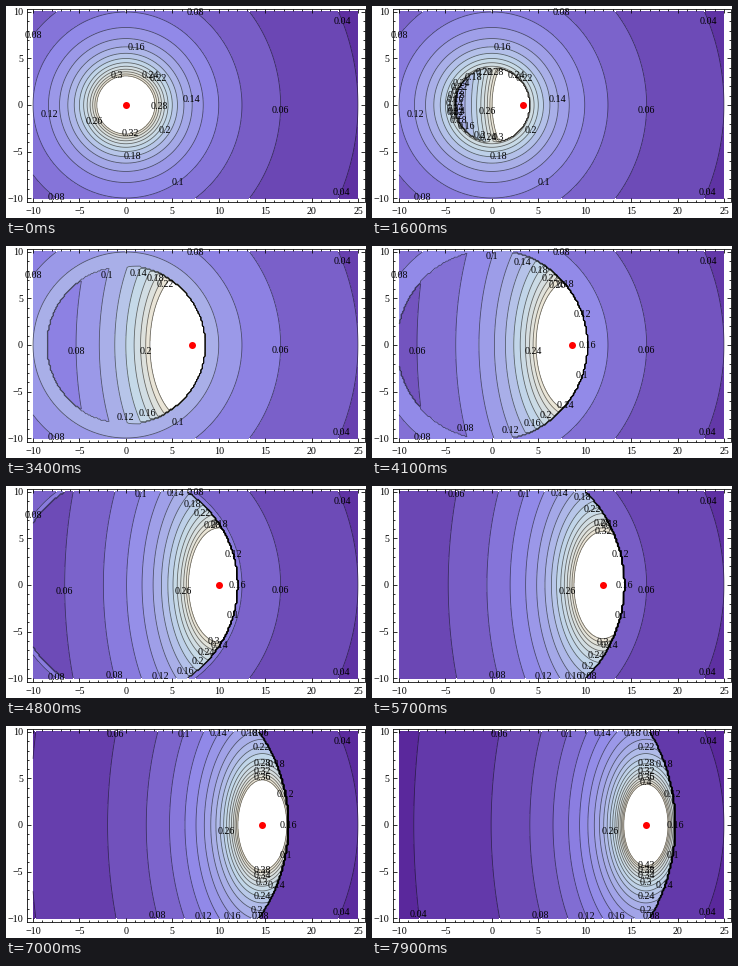
A matplotlib script for the animation above (8 s loop, 360x212 px).

```python
import numpy as np
import matplotlib.pyplot as plt
from matplotlib.animation import FuncAnimation
from matplotlib.ticker import MultipleLocator

W, H, DPI = 360, 212, 100
PX = 72 / DPI
FRAMES = 80
C_STEP, SPEED = 0.25, 0.84          # front radius per frame, charge speed / c
SQUASH = np.sqrt(1 - SPEED ** 2)
EDGE = 9.8                          # height of labels at the plot's border

plt.rcParams["font.family"] = "Liberation Serif"

LAKE = np.array([(0.293, 0.057, 0.529), (0.564, 0.528, 0.909),
                 (0.763, 0.847, 0.914), (0.941, 0.907, 0.834)])

# Label angles on the static circles 0.06, 0.08, ... 0.32
ANGLES = (-2, 53, -56, -173, 5, 80, -83, -33, 39, 50, -152, -2, 107, -82)
FRONT = (6, 18, 12, 16, 10, 14, 8)  # labels down the leading edge

X, Y = np.meshgrid(np.linspace(-10, 25, 235), np.linspace(-10, 10, 135))
STATIC = np.hypot(X, Y)
ARC = np.radians(np.linspace(0, 90, 181))


def lake(t):
    stops = np.linspace(0, 1, len(LAKE))
    return np.column_stack([np.interp(t, stops, c) for c in LAKE.T])


def top_level(k):
    """Highest contour in percent; everything above stays white."""
    v = np.interp(k, (0, 16, 34, 48, 57, 79), (32, 30, 22, 30, 32, 42))
    return int(2 * np.round(v / 2))


def potential(radius, charge):
    moving = np.hypot(X - charge, SQUASH * Y)
    dist = np.where(STATIC < radius, moving, STATIC)
    return 1 / np.maximum(dist, 1e-3)


def static_labels(radius, top):
    spots = [(4, 21), (4, -22), (8, 143), (8, 233)]
    spots += zip(range(6, top + 1, 2), ANGLES)
    for lv, deg in spots:
        r, a = 100 / lv, np.radians(deg)
        if r > radius:
            yield lv, r * np.cos(a), r * np.sin(a)


def arc_end(level, radius, charge):
    """Farthest visible point of a moving contour above the axis."""
    x = charge - np.cos(ARC) * 100 / level
    y = np.sin(ARC) * 100 / level / SQUASH
    ok = (y <= EDGE + 0.1) & (x >= -10)
    ok &= np.hypot(x, y) < radius - min(0.7, 0.1 * radius)
    hits = np.flatnonzero(ok)
    return [(x[i], y[i]) for i in hits[-1:]]


def moving_labels(radius, charge, top):
    """Alternate upper and lower arc ends, with a few labels on the left."""
    left = min(top - 2, 26)
    reach = charge + min(radius, 10)
    inside = [lv for lv in range(4, top + 1, 2) if 100 / lv < reach]
    on_left = {left}
    if radius < np.hypot(10, 10):    # trailing edge still on the stage
        on_left.update(inside[:1])
    for lv in inside:
        if lv in on_left:
            yield lv, charge - 100 / lv, -0.7
            continue
        base = left if lv > left else 0
        side = 1 if (lv - base) % 4 == 2 else -1
        for x, y in arc_end(lv, radius, charge):
            yield lv, x, side * y


def front_labels(radius):
    for lv, y in zip(FRONT, np.linspace(EDGE, -EDGE, len(FRONT))):
        if radius > 10 and lv > 100 / radius:
            yield lv, np.sqrt(radius ** 2 - y ** 2), y


def tail_labels(radius, top):
    """Pile of labels where contours collide on the trailing edge."""
    hi = min(100 / radius, top)
    levels = [v for v in range(4, top + 1, 2)
              if 100 / radius / (1 + SPEED) < v < hi]
    for i, a in enumerate(np.radians(np.linspace(145, 205, 10))):
        if levels:
            yield (levels[-1 - i % len(levels)],
                   radius * np.cos(a), radius * np.sin(a))


def all_labels(radius, charge, top):
    yield from static_labels(radius, top)
    if radius > 2:
        yield from moving_labels(radius, charge, top)
        yield from front_labels(radius)
    if 2 < radius < 6:
        yield from tail_labels(radius, top)


fig = plt.figure(figsize=(W / DPI, H / DPI), dpi=DPI, facecolor="white")
ax = fig.add_axes([20.5 / W, (H - 195.5) / H, 338 / W, 193 / H])
ax.set_xlim(-10.7, 25.7)
ax.set_ylim(-10.376, 10.376)
ax.set_autoscale_on(False)
for axis in (ax.xaxis, ax.yaxis):
    axis.set_major_locator(MultipleLocator(5))
    axis.set_minor_locator(MultipleLocator(1))
ax.tick_params(which="both", direction="in", top=True, right=True,
               width=0.8 * PX, labelsize=10 * PX)
ax.tick_params(which="major", length=4 * PX)
ax.tick_params(which="minor", length=2.5 * PX)
ax.tick_params(axis="x", pad=6 * PX)
ax.tick_params(axis="y", pad=3.5 * PX)
for spine in ax.spines.values():
    spine.set_linewidth(0.8 * PX)

dot, = ax.plot([0], [0], "o", color="red", ms=7 * PX, mew=0, zorder=6)
drawn = []


def update(k):
    while drawn:
        drawn.pop().remove()
    radius = C_STEP * k
    charge = SPEED * radius
    top = top_level(k)
    phi = potential(radius, charge)
    levels = np.arange(2, top + 1, 2) / 100
    shade = lake((levels[:-1] + 0.01) * 100 / top)
    drawn.append(ax.contourf(X, Y, phi, levels=levels, colors=shade,
                             zorder=1))
    drawn.append(ax.contour(X, Y, phi, levels=levels[1:], colors="black",
                            alpha=0.55, linewidths=0.8 * PX, zorder=2))
    for lv, x, y in all_labels(radius, charge, top):
        drawn.append(ax.text(x, y, f"{lv / 100:g}", fontsize=10 * PX,
                             ha="center", va="center", zorder=5))
    dot.set_data([charge], [0])
    return drawn + [dot]


anim = FuncAnimation(fig, update, frames=FRAMES, interval=100,
                     init_func=lambda: update(0), repeat=True,
                     repeat_delay=0, blit=False)
plt.show()
```
